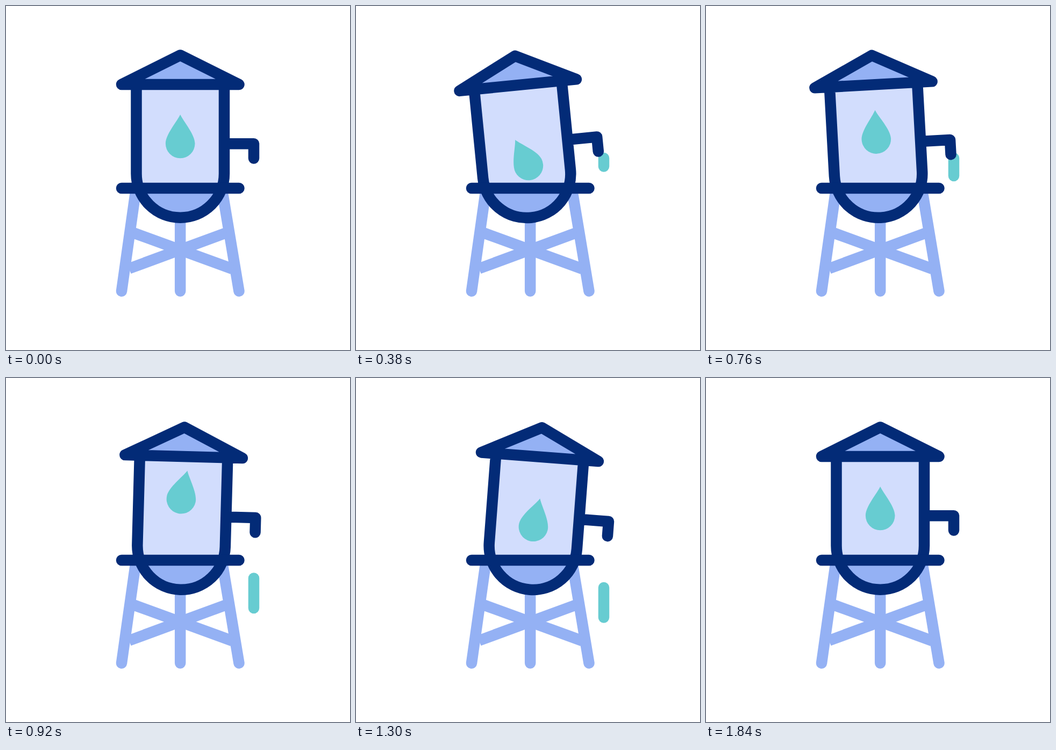
These frames come from a looping animation (640 px wide and 640 px high, 2.4 s). An HTML page:

```html
<!DOCTYPE html>
<html lang="en">
<head>
<meta charset="utf-8">
<title>Water tower</title>
<style>
  html, body { margin: 0; width: 100%; height: 100%; overflow: hidden; background: #fff; }
  svg { display: block; width: 100%; height: 100%; }
  .line { fill: none; stroke-width: 20.5; stroke-linecap: round; stroke-linejoin: round; }
  .navy { stroke: #032b77; }
  .blue { stroke: #94b1f4; }
  .teal { stroke: #67ccd1; }
</style>
</head>
<body>
<svg viewBox="0 0 640 640">
  <g class="line blue">
    <path d="M242 339L215 530.5M324.2 390V530.5M401.5 339L433.5 530.5"/>
    <path stroke-linecap="butt" d="M237 422L421 489M229 488.5L411 421.5"/>
  </g>
  <g id="streams" class="line teal"></g>
  <g id="tank">
    <path fill="#94b1f4" d="M215 146L324.2 91.5L433.5 146ZM242.5 339H406V312A81.75 81.75 0 0 1 242.5 312Z"/>
    <path fill="#d2ddfd" d="M242.5 146H406V339H242.5Z"/>
    <path id="drop" fill="#67ccd1" d="M0-40.8C-6-27.8-27.3-3.8-27.3 13.2A27.3 27.3 0 0 0 27.3 13.2C27.3-3.8 6-27.8 0-40.8Z"/>
    <path class="line navy" d="M215 146L324.2 91.5L433.5 146ZM242.5 146V312A81.75 81.75 0 0 0 406 312V146M406 256.3H461V283.5"/>
  </g>
  <path class="line navy" d="M215 339H433.5"/>
</svg>
<script>
const LOOP = 2400, STEP = 20;
const byId = id => document.getElementById(id);

// Cubic timing curve with handles (x1, 0) and (x2, 1).
const bezier = (x1, x2) => u => {
  let lo = 0, hi = 1;
  for (let i = 0; i < 24; i++) {
    const m = (lo + hi) / 2, n = 1 - m;
    if (3 * n * n * m * x1 + 3 * n * m * m * x2 + m * m * m < u) lo = m;
    else hi = m;
  }
  return lo * lo * (3 - 2 * lo);
};
const sine = u => (1 - Math.cos(Math.PI * u)) / 2;
const settle = bezier(.33, .6);
const plunge = bezier(.33, .5);

// Rows: time, value, easing used to arrive there.
const sway = [[0, 0], [535, -7, sine], [1160, 5, settle], [1800, 0, settle]];
const bob = [[0, 0], [510, 46.5, plunge], [530, 46.5, sine], [890, -31, sine], [1430, 29, sine], [1830, 0, sine]];
const tilt = [[0, 0], [510, -24, plunge], [530, -24, sine], [890, 10.7, sine], [1100, 10.7, sine], [1840, 0, sine]];

function valueAt(track, t) {
  for (let i = 1; i < track.length; i++) {
    const [t0, a] = track[i - 1], [t1, b, ease] = track[i];
    if (t < t1) return a + (b - a) * ease((t - t0) / (t1 - t0));
  }
  return track[track.length - 1][1];
}

const SPOUT = 283, GROUND = 490, SPEED = .7, LAG = 79;
const streams = [358, 713, 1068, 1423].map(start => {
  const path = document.createElementNS("http://www.w3.org/2000/svg", "path");
  byId("streams").append(path);
  return { start, path };
});

function drawStream({ start, path }, t) {
  const age = t - start;
  const head = Math.min(GROUND, SPOUT + age * SPEED);
  const tail = SPOUT + Math.max(0, age - LAG) * SPEED;
  const shown = age > 0 && tail < GROUND;
  path.setAttribute("d", shown ? `M461 ${tail}V${head}` : "");
}

const began = performance.now();
function draw() {
  const now = Math.max(0, performance.now() - began) % LOOP;
  const t = Math.floor(now / STEP) * STEP;
  byId("tank").setAttribute("transform", `rotate(${valueAt(sway, t)} 324.2 380)`);
  byId("drop").setAttribute("transform",
    `translate(324.2 ${242.8 + valueAt(bob, t)}) rotate(${valueAt(tilt, t)})`);
  streams.forEach(s => drawStream(s, t));
  requestAnimationFrame(draw);
}
draw();
</script>
</body>
</html>
```
